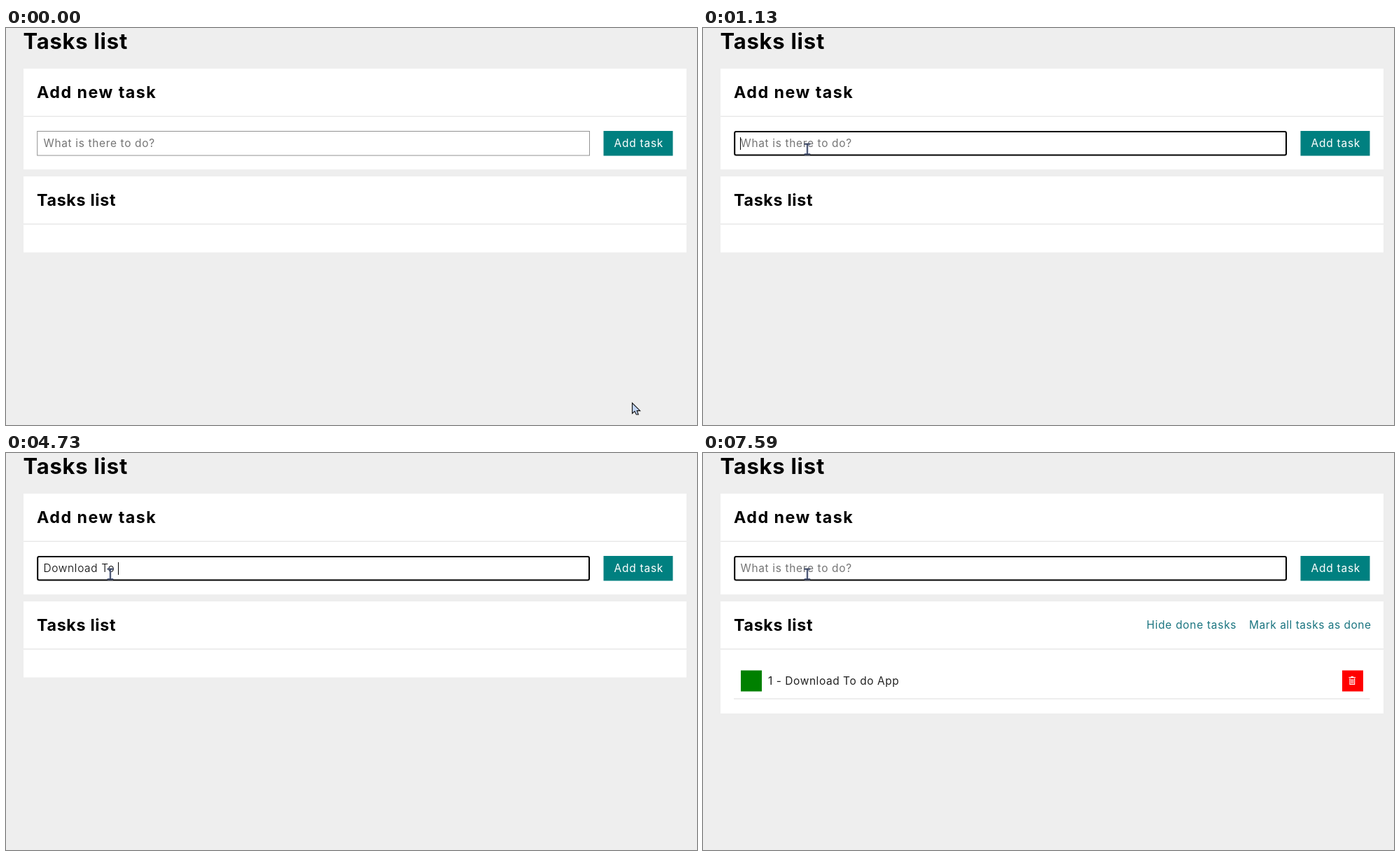
An HTML page for the animation above (8 s loop, 987 by 567 pixels).

```html
<!DOCTYPE html>
<html lang="en">
<head>
<meta charset="utf-8">
<title>Tasks list</title>
<style>
  html, body { margin: 0; width: 100%; height: 100%; overflow: hidden; background: #eee; }
  svg { display: block; }
  text { font: 400 15.5px Inter, sans-serif; letter-spacing: .64px; white-space: pre; }
  .h1 { font-size: 31px; font-weight: 700; letter-spacing: .75px; }
  .h2 { font-size: 23.3px; font-weight: 700; letter-spacing: .65px; }
  .wide { letter-spacing: 1.45px; }
  .btn { fill: #fff; letter-spacing: .75px; }
  .link { fill: #1b7580; letter-spacing: .5px; }
  .loose { letter-spacing: .7px; }
  .hint { fill: #757575; }
  .typed { font-weight: 300; }
  .item { fill: #222; letter-spacing: .55px; }
  .card { fill: #fff; }
  .rule { fill: #e9e9e9; }
  #click { fill: #fbf53c; mix-blend-mode: multiply; }
</style>
</head>
<body>
<svg width="987" height="567" viewBox="0 0 987 567">
  <rect width="987" height="567" fill="#eee"/>
  <text class="h1" x="24.5" y="30">Tasks list</text>

  <rect class="card" x="25" y="58" width="947" height="144"/>
  <text class="h2 wide" x="44" y="100">Add new task</text>
  <rect class="rule" x="25" y="125.5" width="947" height="1.5"/>
  <rect id="field" fill="#fff"/>
  <text id="hint" class="hint" x="53.5" y="170">What is there to do?</text>
  <text id="typed" class="typed" x="53.5" y="170"></text>
  <rect id="caret" y="156" width="1" height="18"/>
  <rect x="853.5" y="147" width="99" height="35.5" fill="#008080"/>
  <text class="btn" x="868.5" y="169.5">Add task</text>

  <rect id="list" class="card" x="25" y="212" width="947" height="108.5"/>
  <text class="h2" x="44" y="253.5">Tasks list</text>
  <rect class="rule" x="25" y="279.3" width="947" height="1.5"/>
  <g id="item">
    <text class="link loose" x="633.5" y="250.5">Hide done tasks</text>
    <text class="link" x="780" y="250.5">Mark all tasks as done</text>
    <rect x="54" y="310.5" width="30" height="30" fill="#008000"/>
    <text class="item" x="93" y="330.5">1 - Download To do App</text>
    <rect x="913" y="310.5" width="30" height="30" fill="#f00"/>
    <path d="M922.5 320.7h9.5M925.5 319.6h3.5M924 322v8.5h6.6V322M926.2 323v6.5M928.4 323v6.5"
          fill="none" stroke="#fff" stroke-width="1.2"/>
    <rect class="rule" x="44" y="350.3" width="908.5" height="1.5"/>
  </g>

  <path id="arrow" d="M.5 .5V15.5L4 12.3L6.3 17H9.3L7.2 11.6H11.7Z"
        fill="#c3d6f6" stroke="#111" stroke-width="1.1"/>
  <g id="beam" fill="none">
    <path d="M-4-7.3H4M-4 7.3H4M0-7V7" stroke="#8495bd" stroke-width="2.6"/>
    <path d="M-4.5-7.3H4.5M-4.5 7.3H4.5M0-7V7" stroke="#2e3448" stroke-width="1.2"/>
  </g>
  <circle id="click" cx="145" cy="173" r="14"/>
</svg>
<script>
const $ = id => document.getElementById(id);
const LOOP = 8000, FOCUS = 820, SUBMIT = 6190;
const TASK = "Download To do App";
const keyTimes = [2070, 2350, 2530, 2870, 3070, 3210, 3530, 3810, 3930,
                  4340, 4610, 4730, 4930, 5070, 5130, 5590, 5870, 5990];
const blinks = [FOCUS, 1270, 1870, SUBMIT, 6530, 7070, 7590];
// time, x, y of the pointer
const path = [
  [0, 894, 535], [70, 858, 512], [140, 715, 430], [200, 520, 345], [270, 320, 265],
  [330, 240, 237], [400, 160, 203], [470, 152, 188], [530, 145, 176],
  [670, 145, 173], [1010, 147, 173], [1130, 149, 173]
];

const passed = (times, t) => times.filter(k => k <= t).length;
const show = (id, on) => $(id).setAttribute("visibility", on ? "visible" : "hidden");
const set = (id, attrs) => {
  for (const name in attrs) $(id).setAttribute(name, attrs[name]);
};

function drawField(t) {
  const focused = t >= FOCUS, done = t >= SUBMIT;
  const text = done ? "" : TASK.slice(0, passed(keyTimes, t));
  set("field", focused
    ? { x: 45.2, y: 148, width: 787.8, height: 33.5, rx: 2, stroke: "#000", "stroke-width": 2 }
    : { x: 44.7, y: 147.5, width: 788.8, height: 34.5, rx: 0, stroke: "#929292", "stroke-width": 1 });
  $("typed").textContent = text;
  show("hint", !text);
  const width = text ? $("typed").getComputedTextLength() : 0;
  set("caret", { x: Math.round(53 + width) });
  show("caret", text || passed(blinks, t) % 2 === (done ? 0 : 1));
}

function drawPointer(t) {
  const [, x, y] = path[passed(path.map(p => p[0]), t) - 1];
  const inField = t >= 530;
  const transform = `translate(${x} ${y})`;
  set("arrow", { transform });
  set("beam", { transform });
  show("arrow", !inField);
  show("beam", inField);
  show("click", t >= 740 && t < FOCUS);
}

function draw(now) {
  const t = now % LOOP, added = t >= SUBMIT;
  drawField(t);
  drawPointer(t);
  show("item", added);
  set("list", { height: added ? 160 : 108.5 });
  requestAnimationFrame(draw);
}
draw(performance.now());
</script>
</body>
</html>
```
